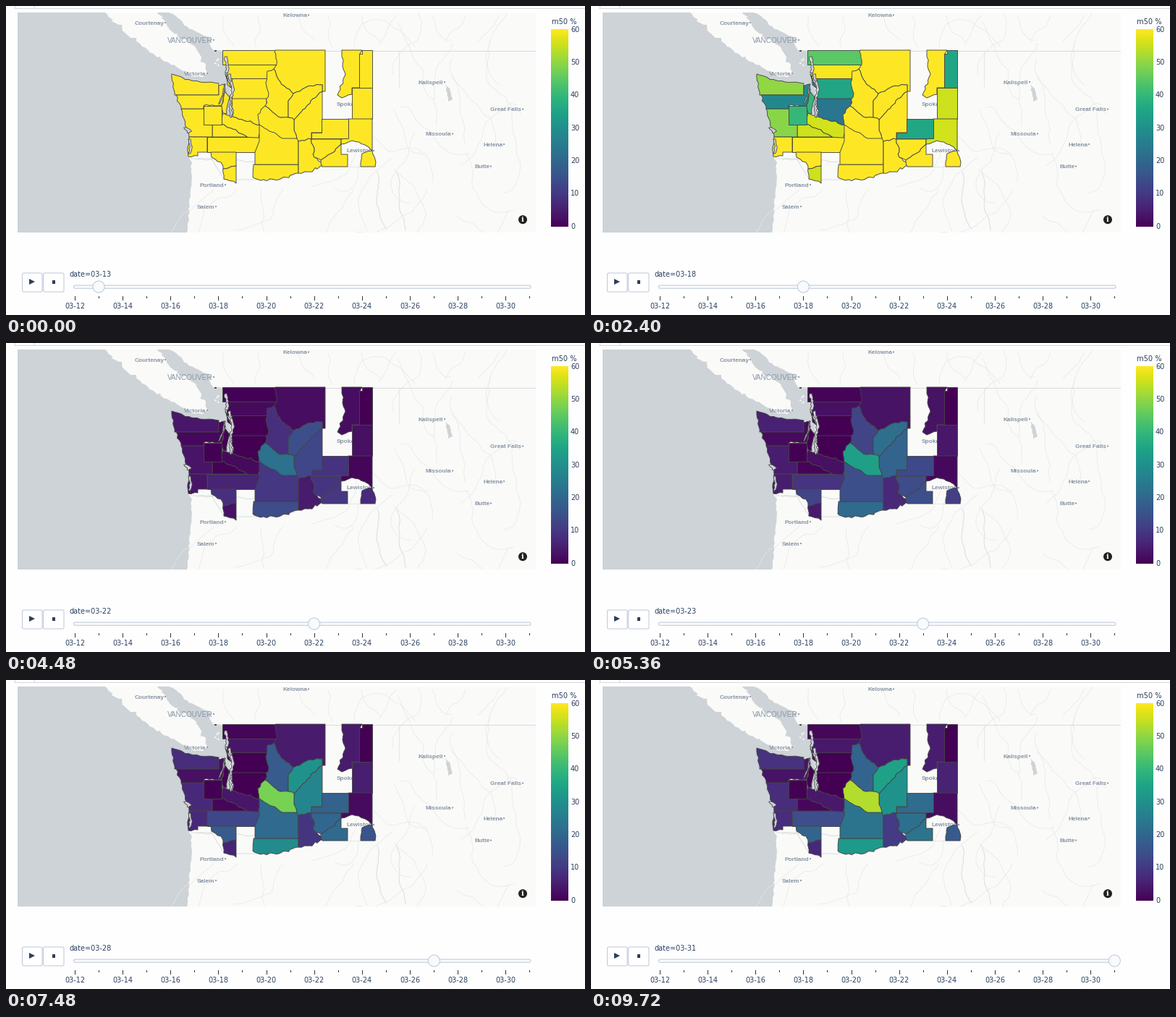
Animation of 800x427 px, one loop 9.8 s. Source, as a matplotlib script:

```python
import numpy as np
import matplotlib.pyplot as plt
from matplotlib.animation import FuncAnimation
from matplotlib.collections import LineCollection, PolyCollection
from matplotlib.patches import Circle, FancyBboxPatch, Polygon, Rectangle

W, H, DPI = 800, 427, 64
LOOP, STEP = 9800, 40
DAY_MS, LEAD_MS, SLIDE_MS = 520, 340, 150
LAND, WATER, FAINT = "#fafaf8", "#cdd3d7", "#e6e8e9"
INK, RAIL, EDGE, CITY = "#2a3f5f", "#bec8d9", "#444444", "#8996a6"
DAYS = np.arange(13, 32)
FULL = 80  # beyond the top of the colour scale

fig = plt.figure(figsize=(W / DPI, H / DPI), dpi=DPI, facecolor="#fefefe")
ax = fig.add_axes([0, 0, 1, 1])
ax.axis("off")
viridis = plt.get_cmap("viridis")
rng = np.random.default_rng(4)


def px(n):
    return n * 72 / DPI


def text(x, y, s, size=9.7, color=INK, **kw):
    kw = {"va": "center", "family": "DejaVu Sans", **kw}
    return ax.text(x, y, s, fontsize=px(size), color=color, **kw)


def rough_edge(a, b, amount):
    """Points from a up to b; slanted edges wander the same way in both directions."""
    if a[0] == b[0] or a[1] == b[1]:
        return [a]
    lo, hi = np.array(sorted([a, b]), float)
    n = max(int(np.hypot(*(hi - lo)) / 4), 1)
    noise = np.random.default_rng([int(v) for v in (*lo, *hi)])
    line = lo + (hi - lo) * np.linspace(0, 1, n + 1)[:, None]
    line[1:-1] += noise.normal(0, amount, (n - 1, 2))
    line = line if tuple(lo) == tuple(a) else line[::-1]
    return [tuple(p) for p in line[:-1]]


def rough(points, amount=0.8):
    edges = zip(points, points[1:] + points[:1])
    return [p for a, b in edges for p in rough_edge(a, b, amount)]


def box(x0, y0, x1, y1):
    return [(x0, y0), (x1, y0), (x1, y1), (x0, y1)]


def area(points, fill=LAND, edge="none", z=2):
    patch = Polygon(points, closed=True, fc=fill, ec=edge, lw=px(0.8), zorder=z)
    ax.add_patch(patch)
    patch.set_clip_path(sea)


def strokes(paths, color, width):
    lines = LineCollection(paths, colors=color, linewidths=px(width), zorder=3)
    ax.add_collection(lines)
    lines.set_clip_path(sea)


def wander(start, heading, steps):
    """A road or stream that turns a little at every step."""
    turn = heading + np.cumsum(rng.normal(0, 0.22, steps))
    move = np.column_stack([np.cos(turn), np.sin(turn)]) * 4
    return np.array(start) + np.cumsum(move, axis=0)


# Base map
sea = Rectangle((16, 9), 716, 303.5, fc=WATER, ec="none", zorder=1)
ax.add_patch(sea)
mainland = [(225, 9), (235, 14), (250, 28), (264, 36), (273, 41), (285, 46), (281, 52),
            (286, 61), (299, 62), (309, 80), (312, 152), (300, 148), (303, 108),
            (294, 107), (256, 103), (229, 94), (235, 123), (242, 142), (253, 181),
            (252, 208), (257, 216), (255, 255), (250, 313), (733, 313), (733, 9)]
big_island = [(137, 9), (152, 24), (172, 44), (185, 52), (198, 64), (213, 70), (240, 87),
              (265, 97), (278, 93), (276, 80), (256, 53), (229, 35), (209, 9)]
area(rough(mainland, 0.7))
area(rough(big_island, 1.8))
for x, y in rng.uniform((282, 72), (294, 92), (4, 2)):
    area([(x - 2, y), (x, y - 2), (x + 2, y + 1)])
area(rough([(607, 108), (613, 114), (617, 129), (611, 132)]), WATER)

columbia = rough([(255, 211), (284, 211), (301, 240), (377, 240), (438, 220)])
strokes([columbia[:-1]] + [wander((x, 225), 1.5, 22) for x in (511, 540)], "#dadfe1", 1)
roads = [wander(p, rng.uniform(0, 6.3), 32)
         for p in rng.uniform((520, 40), (720, 300), (20, 2))]
roads += [wander((x, 250), rng.uniform(0.2, 2.2), 26) for x in range(290, 500, 32)]
roads += [wander((x, 9), rng.uniform(1, 2.1), 13) for x in range(300, 720, 48)]
strokes(roads, FAINT, 0.7)
strokes([[(290, 62), (732, 62)]], "#d8dbdd", 1)
strokes([[(543, 62), (543, 112)], [(506, 62), (506, 200)], [(437, 222), (511, 222)]],
        "#e0e3e5", 0.8)

for name, x, y in [("Courtenay", 220, 23), ("Victoria", 278, 93), ("Kelowna", 418, 12.5),
                   ("Kalispell", 606, 105), ("Great Falls", 714, 142.5),
                   ("Missoula", 617, 176.5), ("Helena", 688, 191), ("Butte", 670, 221.5),
                   ("Portland", 303, 247), ("Salem", 290, 277), ("Spokane", 493, 135),
                   ("Lewiston", 508, 200), ("VANCOUVER", 287, 47)]:
    big = name.isupper()
    text(x - 1.8, y, name, 10 if big else 8.3, CITY, ha="right", va="center_baseline",
         family="Liberation Sans", weight="normal" if big else "bold", zorder=4)
    ax.add_patch(Circle((x, y), 1.1, fc=CITY, ec="none", zorder=4))

# Counties, painted in order so that later ones cover the borders of earlier ones
shapes, levels = [], []


def county(early, late, points, first=FULL):
    """early: level on day 19; late: height of the waves that follow."""
    wave = late * np.array([0.4, 1, 0.85, 0.95])
    shapes.append(rough(points))
    levels.append(np.interp(DAYS, range(13, 32, 3), [FULL, first, early, *wave]))


county(27, 1, box(288, 61, 290, 62))
county(27, 1, box(299, 61, 375, 81))
county(49, 4, box(305, 81, 375, 100))
county(27, 0, box(312, 100, 364, 128), first=52)
county(15, 0, [(312, 128), (360, 128), (360, 164), (350, 164), (313, 153)], first=41)
county(53, 15, box(278, 181, 350, 202))
county(44, 4, [(300, 148), (313, 153), (350, 164), (351, 170), (349, 182), (333, 181),
               (298, 163)])
county(43, 1, [(285, 164), (298, 163), (333, 181), (285, 181)])
county(34, 8, [(242, 142), (285, 142), (285, 181), (253, 181)])
county(20, 0, box(273, 138, 298, 164))
county(55, 8, [(253, 181), (278, 181), (278, 202), (265, 202), (265, 207), (252, 208)])
county(62, 20, [(283, 202), (318, 202), (318, 221), (300, 225), (297, 216), (284, 209)])
county(43, 7, [(300, 225), (318, 221), (318, 245), (301, 239)])
county(63, 34, [(342, 219), (404, 219), (404, 231), (377, 240), (352, 241), (341, 236)])
county(66, 24, [(350, 164), (404, 164), (404, 219), (344, 219), (344, 202), (350, 187)])
county(56, 11, [(404, 187), (422, 184), (426, 209), (438, 220), (420, 229), (404, 231)])
county(57, 23, [(422, 184), (463, 184), (463, 191), (449, 204), (435, 213), (426, 209)])
county(63, 24, [(463, 191), (463, 205), (472, 205), (472, 222), (437, 222), (435, 213),
                (449, 204)])
county(63, 18, [(490, 222), (490, 216), (492, 204), (506, 200), (511, 216), (510, 222)])
county(43, 6, box(478, 113, 506, 156))
county(44, 2, [(473, 156), (506, 156), (506, 200), (496, 192), (478, 186), (463, 191),
               (463, 184), (473, 183)])
county(56, 5, [(372, 61), (441, 61), (441, 118), (437, 118), (437, 109), (417, 111),
               (397, 121), (376, 101), (370, 87), (374, 81)])
county(51, 32, [(437, 118), (437, 175), (422, 175), (422, 184), (404, 187), (402, 183),
                (398, 172), (398, 157), (408, 146), (424, 128)])
county(38, 22, [(436, 156), (473, 156), (473, 183), (422, 183), (422, 175), (436, 175)],
       first=31)
county(64, 20, [(361, 90), (370, 87), (376, 101), (397, 121), (390, 131), (390, 154),
                (376, 153), (358, 138), (363, 121), (359, 106)])
county(62, 36, [(397, 121), (417, 111), (437, 109), (437, 118), (424, 128), (408, 146),
                (398, 157), (390, 154), (390, 131)])
county(66, 56, [(358, 138), (376, 153), (390, 154), (398, 157), (398, 172), (402, 183),
                (382, 183), (350, 164), (348, 150)])
county(51, 5, [(464, 61), (492, 61), (489, 66), (489, 113), (478, 113), (478, 122),
               (464, 127), (458, 123), (469, 95), (464, 70)])
county(13, 0, [(492, 61), (506, 61), (506, 113), (488, 113), (488, 66), (492, 66)])
county(35, 9, [(229, 94), (256, 103), (294, 107), (294, 123), (233, 123)])
county(2, 3, [(235, 123), (294, 123), (294, 110), (303, 108), (298, 137), (273, 138),
              (273, 142), (242, 142)])
county(20, 0, [(303, 118), (309, 126), (305, 149), (300, 148), (298, 137)])
county(14, 0, [(303, 94), (307, 104), (314, 117), (306, 109)], first=44)

counties = PolyCollection(shapes, edgecolors=EDGE, linewidths=px(0.9), zorder=5)
ax.add_collection(counties)
fills = np.clip(np.array(levels).T / 60, 0, 1)


def inlet(top, bottom, xs, width):
    """A ragged arm of the sea running down through the given x places."""
    y = np.arange(top, bottom, 2.5)
    mid = np.interp(y, np.linspace(top, bottom, len(xs)), xs)
    left, right = rng.uniform(0.3, width, (2, len(y)))
    sides = np.column_stack([mid - left, y]), np.column_stack([mid + right, y])[::-1]
    area(np.vstack(sides), WATER, EDGE, 6)


inlet(70, 95, (303, 306, 304), 3)
inlet(94, 155, (309, 313, 310, 311), 3)
inlet(108, 136, (302, 300, 294), 1.2)
inlet(168, 178, (249, 253, 250), 4)
inlet(184, 205, (253, 255, 253), 2.5)

# Attribution button
ax.add_patch(Circle((714, 295.2), 6, fc="#222222", ec="none", zorder=8))
text(714, 295.2, "i", 10, "white", ha="center", family="DejaVu Serif", weight="bold",
     zorder=9)

# Top rule and colour bar
ax.plot([11, 800], [3, 3], color="#d6d8dc", lw=px(1))
for x in (11.5, 38.5):
    ax.plot([x, x], [0, 3], color="#d6d8dc", lw=px(1))
ax.imshow(np.linspace(0, 1, 256)[:, None], cmap=viridis, extent=(753.4, 777.4, 304.6, 32.4),
          origin="lower", aspect="auto", interpolation="bilinear")
text(754, 22, "m50 %", 9.9)
for v in range(0, 61, 10):
    text(780, 304.5 - v * 271.5 / 60, str(v))


# Player buttons and slider
def rounded(x, y, w, h, r, fill):
    ax.add_patch(FancyBboxPatch((x, y), w, h, boxstyle=f"round,pad=0,rounding_size={r}",
                                fc=fill, ec=RAIL, lw=px(1), zorder=8))


def stop_x(i):
    return 95 + 33.07 * i


rounded(22.5, 369, 27.5, 26, 2, "white")
rounded(51.5, 369, 28.5, 26, 2, "white")
ax.add_patch(Polygon([(32, 377), (40, 381), (32, 385)], fc=INK, zorder=9))
ax.add_patch(Rectangle((63.5, 378.8), 4.8, 4.8, fc=INK, zorder=9))
rounded(93.5, 386, 631.5, 4.2, 2, "#f8fafc")
for i in range(20):
    major = i % 2 == 0
    ax.plot([stop_x(i)] * 2, [400.5, 405.5 if major else 403], color="#333333", lw=px(1))
    if major:
        text(stop_x(i), 415, f"03-{12 + i}", ha="center")
label = text(87, 370.7, "")
knob = Circle((0, 388), 8, fc="#f8fafc", ec=RAIL, lw=px(1), zorder=10)
ax.add_patch(knob)

ax.set_xlim(0, W)
ax.set_ylim(H, 0)


def ease(u):
    return 4 * u ** 3 if u < 0.5 else 1 - 4 * (1 - u) ** 3


def update(i):
    t = i * STEP + LEAD_MS
    k = min(t // DAY_MS, len(DAYS) - 1)
    u = min((t - k * DAY_MS) / SLIDE_MS, 1)
    counties.set_facecolor(viridis(fills[k]))
    label.set_text(f"date=03-{DAYS[k]}")
    knob.center = (stop_x(k + ease(u)), 388)
    return counties, label, knob


anim = FuncAnimation(fig, update, frames=LOOP // STEP, interval=STEP, repeat=True,
                     repeat_delay=0, blit=False)
plt.show()
```
